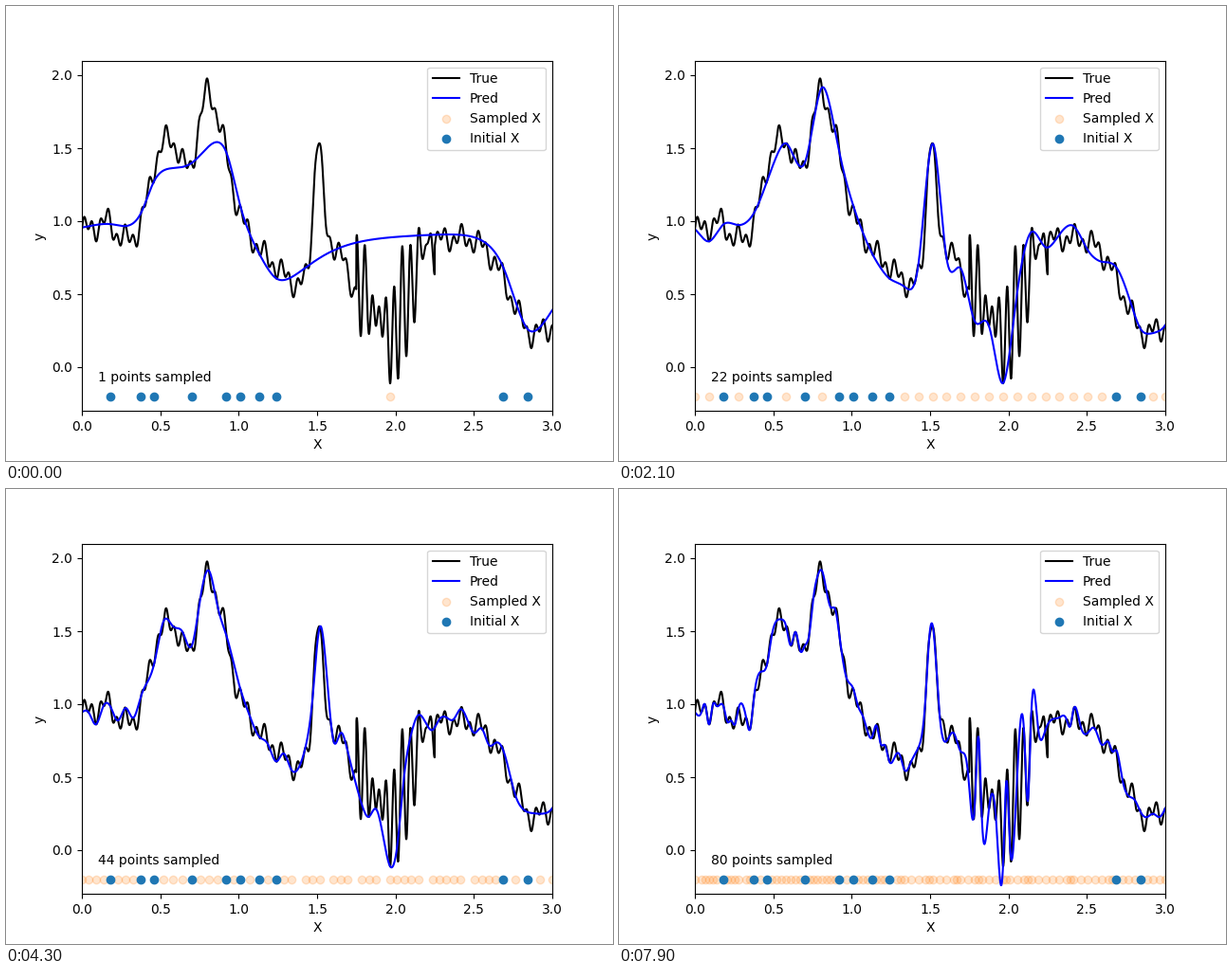
Animation of 640 by 480 pixels, one loop 8000 ms. Source, as a matplotlib script:

```python
import numpy as np
import matplotlib.pyplot as plt
from matplotlib.animation import FuncAnimation

SPAN = 3.0
FRAMES = 80
MEAN = 0.9
DOT_Y = -0.2
EXPLORE_RATE = 12.0

INITIAL = np.array([.184, .378, .46, .70, .922, 1.01, 1.131, 1.24,
                    2.687, 2.843])

# Key points of the slow trend under the ripples
TREND = np.array([
    (0, .945), (.09, .96), (.16, 1.0), (.225, .91), (.285, .88),
    (.345, .91), (.405, 1.11), (.48, 1.44), (.54, 1.56), (.61, 1.49),
    (.66, 1.38), (.695, 1.37), (.75, 1.675), (.80, 1.89), (.85, 1.77),
    (.90, 1.57), (.98, 1.15), (1.09, .875), (1.25, .68), (1.36, .575),
    (1.44, .61), (1.505, .72), (1.58, .845), (1.64, .79), (1.73, .55),
    (1.80, .51), (1.89, .34), (1.97, .22), (2.07, .455), (2.19, .83),
    (2.27, .868), (2.43, .88), (2.53, .85), (2.64, .71), (2.76, .425),
    (2.86, .23), (2.94, .255), (3.0, .275),
])


def trend(x):
    """Cubic Hermite curve through the key points."""
    px, py = TREND.T
    slope = np.gradient(py, px)
    i = np.clip(np.searchsorted(px, x, side="right") - 1, 0, len(px) - 2)
    h = px[i + 1] - px[i]
    t = (x - px[i]) / h
    return (py[i] * (1 + 2 * t) * (1 - t) ** 2
            + py[i + 1] * t * t * (3 - 2 * t)
            + h * t * (1 - t) * (slope[i] * (1 - t) - slope[i + 1] * t))


def true_f(x):
    ripple = 0.05 * (np.sin(50 * x) + np.sin(120 * x))
    peak = 0.85 * np.exp(-((x - 1.505) / 0.04) ** 2)
    burst = 0.4 * np.sin(10 * x) * np.cos(120 * x)
    return trend(x) + ripple + peak + np.where(abs(x - 2) <= 0.25, burst, 0)


def kernel(a, b, rate):
    """Matern 3/2 covariance."""
    r = rate * np.abs(a[:, None] - b[None, :])
    return (1 + r) * np.exp(-r)


def weights(x, seen, rate):
    cov = kernel(seen, seen, rate) + 1e-5 * np.eye(len(seen))
    cross = kernel(x, seen, rate)
    return cross, np.linalg.solve(cov, cross.T).T


def explore(count):
    """Pick each next point where the variance is largest."""
    pool = np.linspace(0, SPAN, 1001)
    seen = INITIAL
    for _ in range(count):
        cross, w = weights(pool, seen, EXPLORE_RATE)
        known = np.sum(cross * w, axis=1)
        seen = np.append(seen, pool[np.argmin(known)])
    return seen[len(INITIAL):]


def predict(x, count):
    """Posterior mean; the length scale shortens as data comes in."""
    seen = np.concatenate([INITIAL, SAMPLED[:count]])
    rate = 12 - 5 * np.exp(-count / 8)
    _, w = weights(x, seen, rate)
    return MEAN + w @ (true_f(seen) - MEAN)


SAMPLED = explore(FRAMES)

fig, ax = plt.subplots(figsize=(6.4, 4.8), dpi=100)
grid = np.linspace(0, SPAN, 1000)
fine = np.linspace(0, SPAN, 3000)

ax.plot(fine, true_f(fine), color="black", label="True")
pred, = ax.plot([], [], color="blue", label="Pred")
dots = ax.scatter([], [], color="#ff7f0e", alpha=0.2, label="Sampled X")
ax.scatter(INITIAL, np.full(len(INITIAL), DOT_Y), color="#1f77b4",
           label="Initial X")
note = ax.text(0.1, -0.1, "")

ax.set_xlim(0, SPAN)
ax.set_ylim(-0.3, 2.1)
ax.set_xlabel("X")
ax.set_ylabel("y")
ax.legend(loc="upper right")


def update(k):
    pred.set_data(grid, predict(grid, k))
    shown = SAMPLED[:k + 1]
    dots.set_offsets(np.column_stack([shown, np.full(len(shown), DOT_Y)]))
    note.set_text(f"{k + 1} points sampled")
    return pred, dots, note


anim = FuncAnimation(fig, update, frames=FRAMES, interval=100, repeat=True,
                     repeat_delay=0)
plt.show()
```
